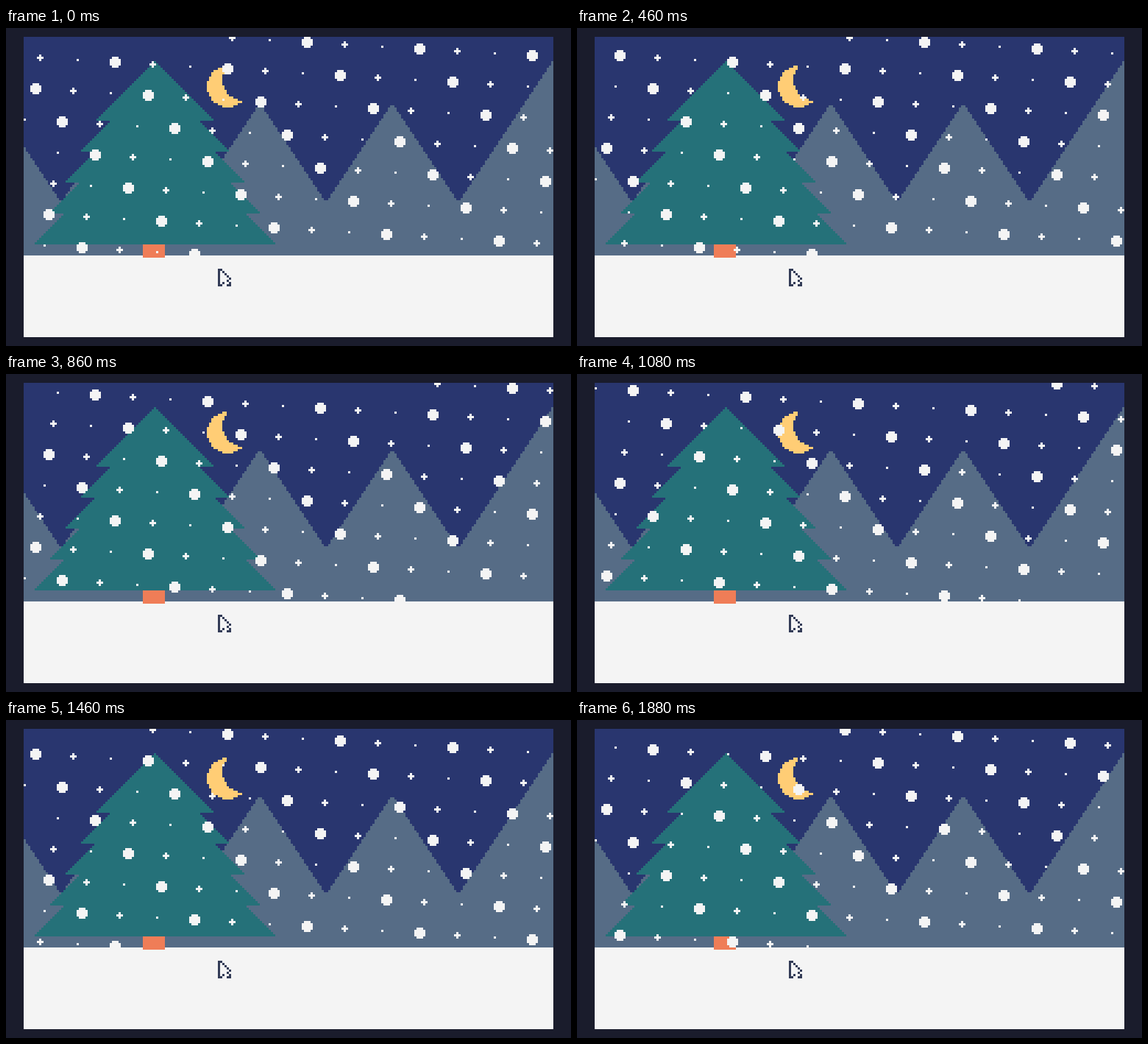
Write an HTML page with a canvas that moves like this. It is 768 px wide and 432 px high and loops after 1900 ms.

```html
<!DOCTYPE html>
<html lang="en">
<head>
<meta charset="utf-8">
<title>Snowfall</title>
<style>
  html, body { margin: 0; width: 100%; height: 100%; overflow: hidden; background: #1a1c2c; }
  canvas { display: block; width: 768px; height: 432px; image-rendering: pixelated; }
</style>
</head>
<body>
<canvas id="stage" width="256" height="144"></canvas>
<script>
const ctx = document.getElementById('stage').getContext('2d');
const LOOP = 1900, STEP = 20;
const FLAKES = 99, GROUND = 99;
const NAVY = '#29366f', SLATE = '#566c86', GREEN = '#257179', ORANGE = '#ef7d57',
      YELLOW = '#ffcd75', WHITE = '#f4f4f4', INK = '#333c57';
const CURSOR = ['##', '# #', '#  #', '#   #', '#    #', '#   #', '# #  #', '##  ##'];

// Everything is drawn on a 240 x 136 pixel screen inside a dark border.
ctx.fillStyle = '#1a1c2c';
ctx.fillRect(0, 0, 256, 144);
ctx.translate(8, 4);
ctx.beginPath();
ctx.rect(0, 0, 240, 136);
ctx.clip();

function rect(x, y, w, h, color) {
  ctx.fillStyle = color;
  ctx.fillRect(x, y, w, h);
}

function disc(cx, cy, r, color) {
  for (let dy = -r; dy <= r; dy++) {
    const half = Math.floor(Math.sqrt(r * r + 0.8 * r - dy * dy));
    rect(cx - half, cy + dy, 2 * half + 1, 1, color);
  }
}

function mountains() {
  for (let x = 0; x < 240; x++) {
    const u = (x + 43.5) % 60;
    const rise = x < 197 ? Math.min(u, 60 - u) : x - 196.5;
    const top = Math.ceil(74.5 - 1.5 * rise);
    rect(x, top, 1, GROUND - top, SLATE);
  }
}

function tree() {
  for (let tier = 0; tier < 5; tier++) {
    const end = 38 + 14 * tier;
    for (let y = tier ? end - 14 : 11; y < end; y++) {
      const half = y - 11 - 7 * tier;
      rect(59 - half, y, 2 * half + 1, 1, GREEN);
    }
  }
  rect(54, 94, 10, 6, ORANGE);
}

function cursor() {
  CURSOR.forEach((row, y) => [...row].forEach((c, x) => {
    if (c === '#') rect(88 + x, 105 + y, 1, 1, INK);
  }));
}

function flake(i, fall) {
  const x = i * 17 % 240, y = (i + fall) % FLAKES;
  if (i % 3 === 0) return rect(x, y, 1, 1, WHITE);
  const r = i % 3 === 1 ? 2 : 1, arm = r - 1;
  rect(x - r, y - arm, 2 * r + 1, 2 * arm + 1, WHITE);
  rect(x - arm, y - r, 2 * arm + 1, 2 * r + 1, WHITE);
}

function draw() {
  // Flakes fall one pixel per sixtieth of a second.
  const tick = Math.floor(performance.now() % LOOP / STEP);
  const fall = 37 + Math.floor(tick * 6 / 5);
  rect(0, 0, 240, 136, NAVY);
  disc(92, 22, 9, YELLOW);
  disc(99, 19, 9, NAVY);
  mountains();
  rect(0, GROUND, 240, 37, WHITE);
  tree();
  for (let i = 0; i < FLAKES; i++) flake(i, fall);
  cursor();
  requestAnimationFrame(draw);
}
draw();
</script>
</body>
</html>
```
